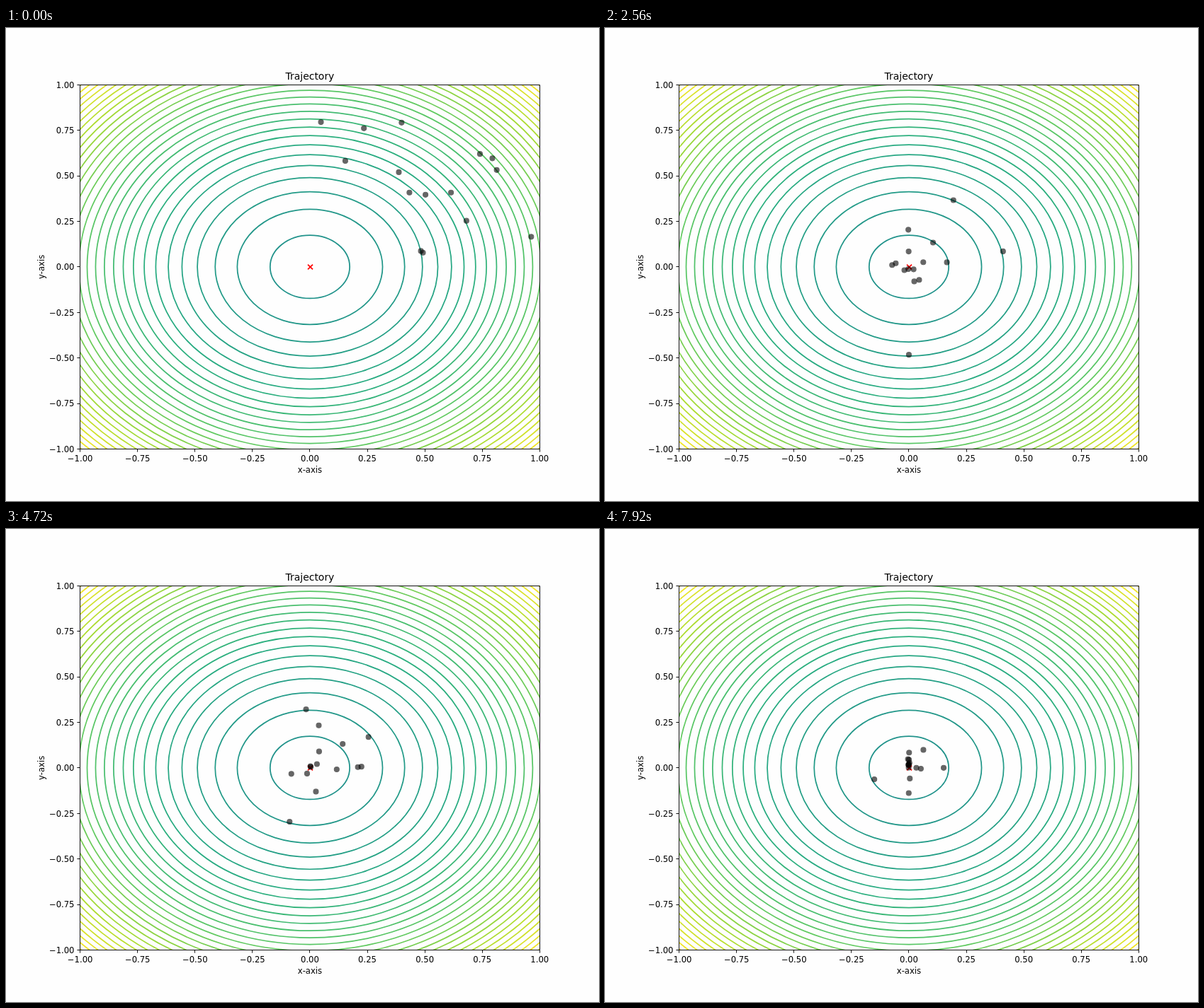
Write an HTML page that moves like this. It is 837 by 669 pixels and loops after 8 s.

```html
<!DOCTYPE html>
<html lang="en">
<head>
<meta charset="utf-8">
<title>Trajectory</title>
<style>
  html, body { margin: 0; width: 100%; height: 100%; overflow: hidden; background: #fefefe; }
  svg { display: block; width: 837px; height: 669px; }
  text { font-family: "DejaVu Sans", sans-serif; font-size: 11.625px; fill: #000; }
</style>
</head>
<body>
<svg id="stage" viewBox="0 0 837 669"></svg>
<script>
const W = 837, H = 669, PT = 1.1625;
const left = W * 0.125, right = W * 0.9, upper = H * 0.12, lower = H * 0.89;
const cx = (left + right) / 2, cy = (upper + lower) / 2;
const rx = (right - left) / 2, ry = (lower - upper) / 2;
const STEP = 80, STEPS = 100;
const stage = document.getElementById("stage");

function add(parent, tag, attrs, text) {
  const el = document.createElementNS("http://www.w3.org/2000/svg", tag);
  for (const k in attrs) el.setAttribute(k, attrs[k]);
  if (text !== undefined) el.textContent = text;
  parent.appendChild(el);
  return el;
}

// Upper half of the colour map, from teal to yellow.
const ramp = [[33, 145, 140], [40, 174, 128], [94, 201, 98], [173, 220, 48], [253, 231, 37]];
function colour(t) {
  const p = Math.min(t, 0.9999) * (ramp.length - 1), i = Math.floor(p);
  return `rgb(${ramp[i].map((c, k) => Math.round(c + (ramp[i + 1][k] - c) * (p - i)))})`;
}

const clip = add(add(stage, "defs", {}), "clipPath", { id: "plot" });
add(clip, "rect", { x: left, y: upper, width: right - left, height: lower - upper });
const plot = add(stage, "g", { "clip-path": "url(#plot)" });

// Contours of x² + y², evenly spaced in level.
for (let level = 0.03; level < 2; level += 0.07) {
  const r = Math.sqrt(level);
  add(plot, "ellipse", {
    cx, cy, rx: r * rx, ry: r * ry,
    fill: "none", stroke: colour((level + 2) / 1.995 - 1), "stroke-width": 1.5 * PT
  });
}

const arm = 3 * PT;
add(plot, "path", {
  d: `M${429.5 - arm} ${338 - arm}l${2 * arm} ${2 * arm}m0 ${-2 * arm}l${-2 * arm} ${2 * arm}`,
  stroke: "#f00", "stroke-width": 1.5 * PT, fill: "none"
});

// Starting points of the swarm, in plot units.
const starts = [
  [0.048, 0.795], [0.235, 0.761], [0.399, 0.792], [0.154, 0.582], [0.387, 0.52],
  [0.433, 0.408], [0.503, 0.396], [0.614, 0.408], [0.74, 0.62], [0.794, 0.596],
  [0.813, 0.532], [0.681, 0.253], [0.963, 0.165], [0.483, 0.087], [0.492, 0.078]
];
const dots = starts.map(() => add(plot, "circle", {
  r: 3 * PT, fill: "#000", stroke: "#000", "stroke-width": PT, opacity: 0.6
}));

// Frame, ticks and labels.
const snap = v => Math.floor(v) + 0.5;
const line = { stroke: "#000", "stroke-width": 0.93, fill: "none" };
add(stage, "path", { ...line, d: "M104.5 80.5H753.5V595.5H104.5Z" });
for (let i = 0; i <= 8; i++) {
  const v = i / 4 - 1, label = v.toFixed(2).replace("-", "\u2212");
  const x = cx + v * rx, y = cy - v * ry;
  add(stage, "path", { ...line, d: `M${snap(x)} 595.5v4.1M104.5 ${snap(y)}h-4.1` });
  add(stage, "text", { x, y: 612.5, "text-anchor": "middle" }, label);
  add(stage, "text", { x: 96.5, y: y + 4.4, "text-anchor": "end" }, label);
}
add(stage, "text", { x: cx, y: 628.8, "text-anchor": "middle" }, "x-axis");
add(stage, "text", { transform: `translate(53.6 ${cy}) rotate(-90)`, "text-anchor": "middle" }, "y-axis");
add(stage, "text", { x: cx, y: 73.4, "text-anchor": "middle", style: "font-size:13.95px" }, "Trajectory");

function random(seed) {
  const s = Math.sin(seed * 127.1 + 31.7) * 43758.5453;
  return s - Math.floor(s);
}

// Mostly small values with rare large ones, gliding from one to the next.
function burst(seed, t) {
  const i = Math.floor(t), u = t - i, ease = u * u * (3 - 2 * u);
  const peak = k => random(seed * 17 + k) ** 3;
  return peak(i) + (peak(i + 1) - peak(i)) * ease;
}

// A particle swings through the centre from its start, then wanders ever closer to it.
function place(i, axis, step) {
  const seed = 2 * i + axis + 1;
  const speed = 0.5 + 0.4 * random(seed);
  const memory = Math.exp(-step / 9);
  const reach = (axis ? 1.1 : 1.5) * Math.exp(-step / 55) * (1 - memory);
  return starts[i][axis] * memory * Math.cos(speed * step)
    + reach * burst(seed, step / 10) * Math.sin(speed * step + 6.28 * random(seed + 100));
}

function draw(time) {
  const step = Math.floor(time / STEP) % STEPS;
  dots.forEach((dot, i) => {
    dot.setAttribute("cx", (cx + rx * place(i, 0, step)).toFixed(2));
    dot.setAttribute("cy", (cy - ry * place(i, 1, step)).toFixed(2));
  });
}

let start;
function tick(now) {
  if (start === undefined) start = now;
  draw(now - start);
  requestAnimationFrame(tick);
}
draw(0);
requestAnimationFrame(tick);
</script>
</body>
</html>
```
